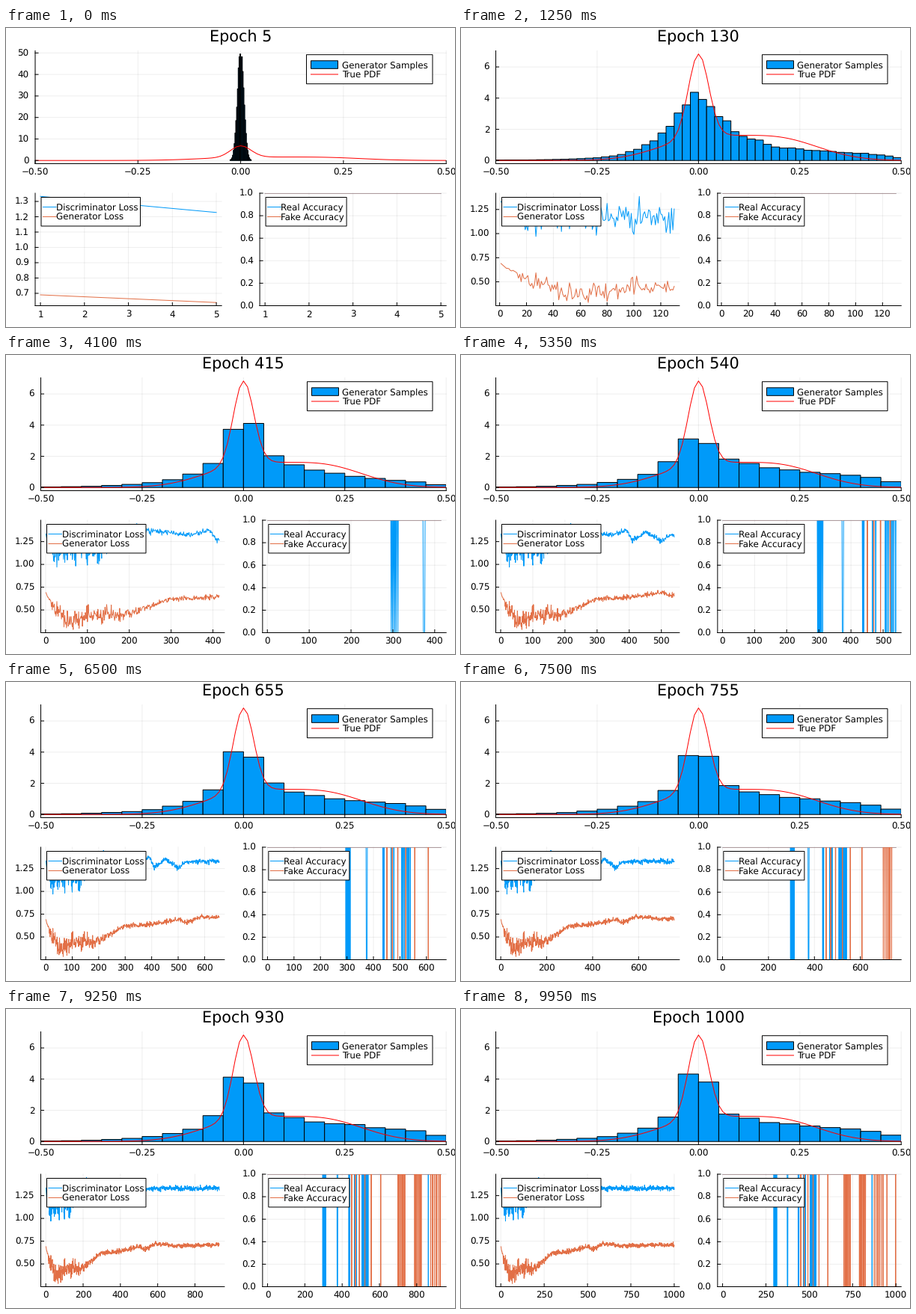
Recreate the animation shown at these times as a matplotlib script. Size 600 by 400 pixels, loop 10000 ms.

```python
import numpy as np
import matplotlib.pyplot as plt
from matplotlib.animation import FuncAnimation
from matplotlib.patches import Rectangle

W, H = 600, 400
FRAMES, INTERVAL, EPOCH_STEP = 200, 50, 5
EPOCHS = FRAMES * EPOCH_STEP
PT = 0.72  # points per pixel at 100 dpi
BLUE, ORANGE, RED = "#009af9", "#e26f46", "#ff0000"
RIGHT, GAP = 588.2, 51
BODY, HEADING = 11.88, 20.8

plt.rcParams["font.family"] = "DejaVu Sans"
plt.rcParams["text.hinting"] = "none"
fig = plt.figure(figsize=(W / 100, H / 100), dpi=100, facecolor="white")
ax = fig.add_axes([0, 0, 1, 1])
ax.set_xlim(0, W)
ax.set_ylim(H, 0)
ax.axis("off")


# ---- drawing helpers, all in pixels ----

def line(xs, ys, color="black", clip=None, **kw):
    art, = ax.plot(xs, ys, color=color, lw=PT, zorder=1, snap=False,
                   scalex=False, scaley=False, **kw)
    if clip is not None:
        art.set_clip_path(clip)


def box(x, y, w, h, fill, clip=None):
    art = ax.add_patch(Rectangle((x, y), w, h, fc=fill, ec="black",
                                 lw=PT, zorder=1, snap=False))
    if clip is not None:
        art.set_clip_path(clip)


def text(x, y, s, size=BODY, ha="left"):
    ax.text(x, y, s, fontsize=size * PT, ha=ha, va="baseline", zorder=1)


def wipe():
    for group in (ax.lines, ax.patches, ax.texts):
        for art in list(group):
            art.remove()


# ---- ticks ----

STEPS = ((1, 1.0), (5, 0.9), (2, 0.7), (2.5, 0.5), (3, 0.2))


def nice_ticks(lo, hi):
    """Score candidate steps by count, niceness, coverage and zero."""
    best, ticks = (-np.inf, 0), []
    for mag in 10.0 ** np.arange(-2, 4):
        for q, nice in STEPS:
            step = q * mag
            k = np.arange(np.ceil(lo / step - 1e-9),
                          np.floor(hi / step + 1e-9) + 1)
            n = len(k)
            if not 4 <= n <= 8:
                continue
            score = (0.25 * (1 - abs(n - 5) / 5) + 0.25 * nice
                     + 0.5 * (hi - lo) / ((n - 1) * step) + (0 in k) / 6)
            rank = (round(score, 9), -n)
            if rank > best:
                best, ticks = rank, k * step
    return ticks


def labels(ticks):
    digits = next(d for d in range(4)
                  if np.allclose(ticks, np.round(ticks, d), atol=1e-6))
    return [f"{v + 0:.{digits}f}".replace("-", "\u2212") for v in ticks]


def widen(lo, hi):
    pad = 0.03 * (hi - lo)
    return lo - pad, hi + pad


class Panel:
    def __init__(self, x0, x1, top, bottom, xlim, ylim, xticks, yticks):
        self.x0, self.x1, self.top, self.bottom = x0, x1, top, bottom
        self.xlim, self.ylim = xlim, ylim
        self.xticks, self.yticks = xticks, yticks
        self.clip = Rectangle((x0, top), x1 - x0, bottom - top,
                              transform=ax.transData)

    def px(self, x):
        lo, hi = self.xlim
        return self.x0 + (np.asarray(x) - lo) / (hi - lo) * (self.x1 - self.x0)

    def py(self, y):
        lo, hi = self.ylim
        return self.bottom - (np.asarray(y) - lo) / (hi - lo) * (self.bottom - self.top)

    def grid(self):
        for x in self.px(self.xticks):
            line([x, x], [self.top, self.bottom], alpha=0.065)
        for y in self.py(self.yticks):
            line([self.x0, self.x1], [y, y], alpha=0.065)

    def axes(self):
        line([self.x0, self.x0], [self.top, self.bottom])
        line([self.x0, self.x1], [self.bottom, self.bottom])
        for x, s in zip(self.px(self.xticks), labels(self.xticks)):
            line([x, x], [self.bottom, self.bottom - 4])
            text(x, self.bottom + 15.8, s, ha="center")
        for y, s in zip(self.py(self.yticks), labels(self.yticks)):
            line([self.x0, self.x0 + 4], [y, y])
            text(self.x0 - 8.3, y + 4.2, s, ha="right")

    def plot(self, x, y, color):
        line(self.px(x), self.py(y), color, self.clip)

    def bars(self, left, heights, width):
        base = float(self.py(0))
        step = float(self.px(width) - self.px(0))
        for x, y in zip(self.px(left), self.py(heights)):
            box(x, y, step, base - y, BLUE, self.clip)

    def legend(self, width, names):
        x, y = self.x0 + 8, self.top + 5.5
        box(x, y, width, 38.5, "white")
        for i, (name, color) in enumerate(zip(names, (BLUE, ORANGE))):
            row = y + 13 + 13 * i
            line([x + 2.5, x + 20], [row, row], color)
            text(x + 20.3, row + 4.4, name)


# ---- training curves ----

rng = np.random.default_rng(7)
epochs = np.arange(1, EPOCHS + 1)


def noisy(knots, early, late, settle):
    """Line through key points; noise fades from early to late at settle."""
    fade = 1 / (1 + np.exp((epochs - settle) / 22))
    amp = (late + early * fade) * np.clip((epochs - 5) / 15, 0, 1)
    return np.interp(epochs, *zip(*knots)) + amp * rng.normal(size=EPOCHS)


disc_loss = noisy([(1, 1.333), (5, 1.228), (50, 1.16), (130, 1.19),
                   (240, 1.38), (345, 1.32), (392, 1.38), (410, 1.26),
                   (452, 1.36), (500, 1.26), (530, 1.33), (1000, 1.33)],
                  0.08, 0.014, 180).clip(0.97, 1.4)
disc_loss[217] = 1.45  # one spike sets the upper axis limit

gen_loss = noisy([(1, .69), (5, .64), (25, .53), (50, .37), (100, .44),
                  (200, .46), (300, .62), (400, .64), (500, .69),
                  (530, .655), (590, .725), (700, .7), (1000, .71)],
                 0.036, 0.012, 200).clip(0.28)


def accuracy(bursts):
    """Ones, with evenly spread drops to zero inside each burst."""
    values = np.ones(EPOCHS)
    for first, last, count in bursts:
        values[np.linspace(first, last, count).astype(int) - 1] = 0
    return values


real_acc = accuracy([(296, 312, 6), (373, 376, 4), (436, 440, 3),
                     (467, 477, 2), (507, 539, 7), (862, 862, 1)])
fake_acc = accuracy([(451, 492, 3), (522, 556, 2), (607, 607, 1),
                     (700, 736, 6), (789, 824, 6), (875, 925, 6),
                     (948, 998, 2)])


# ---- histogram of generated samples ----

def gauss(x, mean, sd):
    return np.exp(-0.5 * ((x - mean) / sd) ** 2) / (sd * np.sqrt(2 * np.pi))


def spread_shape(x, core, core_w, left, left_w, right, right_w):
    """Central bump on two exponential tails."""
    tails = np.where(x < 0, left * np.exp(x / left_w),
                     right * np.exp(-x / right_w))
    edge = 1 / (1 + np.exp((x - 0.49) / 0.03))
    return (tails + core * np.exp(-(x / core_w) ** 2)) * edge


def histogram(epoch):
    sd = np.exp(np.interp(epoch, [5, 30, 60, 110],
                          np.log([.0077, .02, .045, .08])))
    sharp = epoch >= 535 and epoch % 80 == 55
    if sharp:
        width = 0.02
    elif epoch >= 150:
        width = 0.05
    else:
        width = next(w for w in (.002, .005, .01, .02) if w >= 7 * sd / 45)
    half = round(0.5 / width)
    left = np.arange(-half, half) * width
    mid = left + width / 2

    if sharp:
        heights = spread_shape(mid, 6.1, .018, 4.3, .06, 4, .14)
    else:
        keys = [250, 415, 540, 655, 1000]
        core = np.interp(epoch, keys, [1.6, 2.2, 1.1, 2.1, 2.4])
        tail = np.interp(epoch, keys, [.4, .22, .4, .35, .45])
        late = np.clip((epoch - 90) / 60, 0, 1)
        heights = ((1 - late) * gauss(mid, 0, sd)
                   + late * spread_shape(mid, core, .05, 2.8, .105,
                                         1.3 + .27 / tail, tail))
    heights = heights * (1 + 0.04 * np.random.default_rng(epoch).normal(size=len(mid)))
    keep = heights > 0.004 * heights.max()
    return left[keep], heights[keep], width


pdf_x = np.linspace(-0.5, 0.5, 101)
pdf_y = (gauss(pdf_x, 0, .025) + gauss(pdf_x, 0, .1) + gauss(pdf_x, .2, .1)) / 3


def top_legend(x0):
    x = 401.5 + 0.13 * (x0 - 39)
    box(x, 35.7, 570 - x, 39, "white")
    box(x + 6, 43.8, 36, 10.5, BLUE)
    line([x + 6, x + 42], [62, 62], RED)
    text(449.3, 53.4, "Generator Samples")
    text(449.3, 66.2, "True PDF")


def update(frame):
    wipe()
    epoch = EPOCH_STEP * (frame + 1)
    x, d, g = epochs[:epoch], disc_loss[:epoch], gen_loss[:epoch]
    left, heights, width = histogram(epoch)

    hist_lim = widen(0, max(heights.max(), pdf_y.max()))
    loss_lim = widen(min(d.min(), g.min()), max(d.max(), g.max()))
    epoch_lim = widen(1, epoch)
    hist_ticks, loss_ticks = nice_ticks(*hist_lim), nice_ticks(*loss_lim)
    epoch_ticks = nice_ticks(*epoch_lim)

    # the left margin follows the widest tick label
    chars = max(map(len, labels(hist_ticks) + labels(loss_ticks)))
    x0 = 46.5 + 7.5 * (chars - 4)
    half = (RIGHT - x0 - GAP) / 2

    top = Panel(x0, RIGHT, 30.5, 181.5, (-0.5, 0.5), hist_lim,
                np.linspace(-0.5, 0.5, 5), hist_ticks)
    top.grid()
    top.bars(left, heights, width)
    top.plot(pdf_x, pdf_y, RED)
    top.axes()
    top_legend(x0)
    text((x0 + RIGHT) / 2, 18.5, f"Epoch {epoch}", HEADING, "center")

    loss = Panel(x0, x0 + half, 221, 371.5, epoch_lim, loss_lim,
                 epoch_ticks, loss_ticks)
    loss.grid()
    loss.plot(x, d, BLUE)
    loss.plot(x, g, ORANGE)
    loss.axes()
    loss.legend(132.5, ("Discriminator Loss", "Generator Loss"))

    acc = Panel(RIGHT - half, RIGHT, 221, 371.5, epoch_lim, (0, 1),
                epoch_ticks, np.linspace(0, 1, 6))
    acc.grid()
    acc.plot(x, real_acc[:epoch], BLUE)
    acc.plot(x, fake_acc[:epoch], ORANGE)
    acc.axes()
    acc.legend(108, ("Real Accuracy", "Fake Accuracy"))
    return []


anim = FuncAnimation(fig, update, frames=FRAMES, interval=INTERVAL,
                     repeat=True, repeat_delay=0, blit=False)
plt.show()
```
